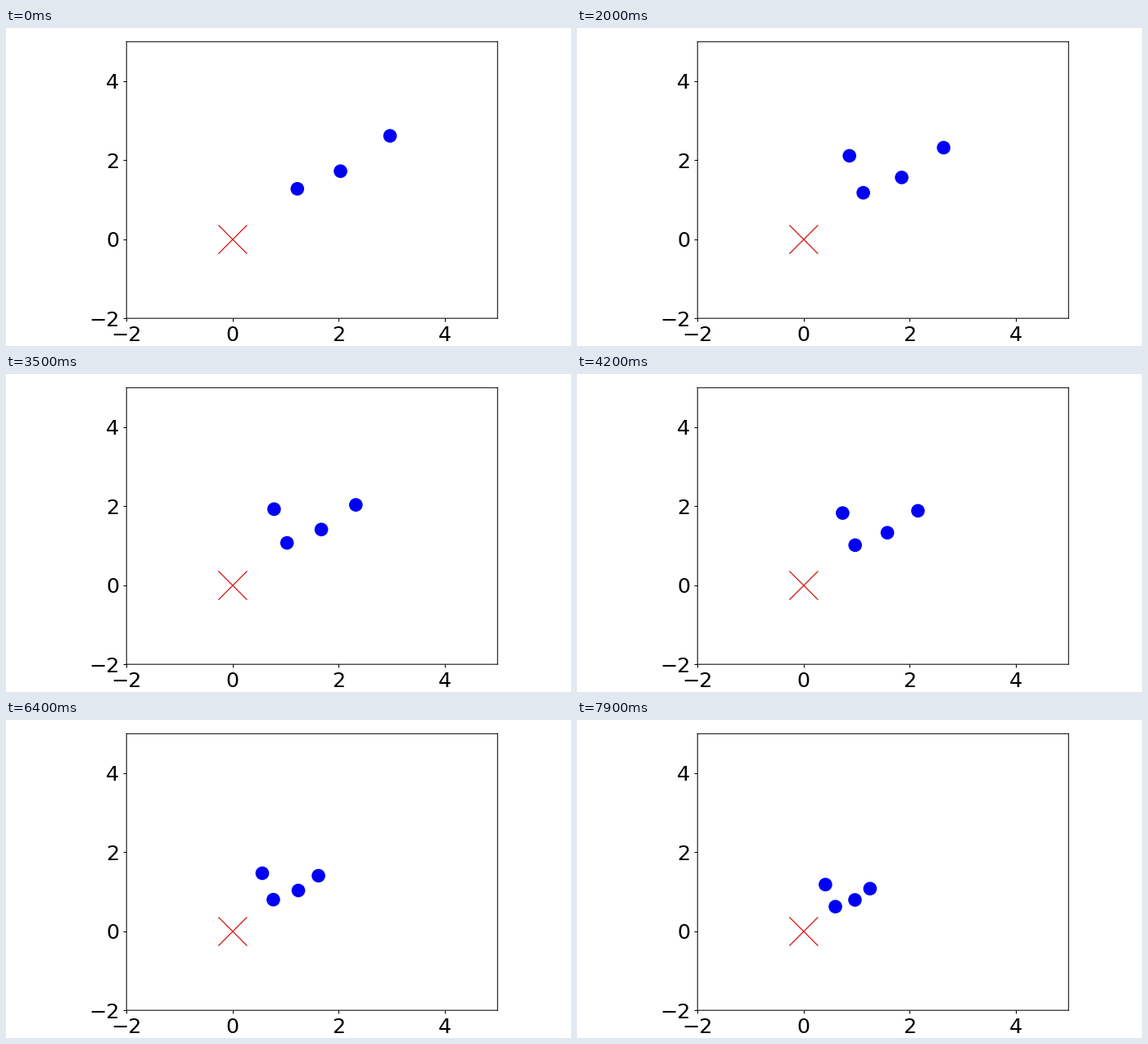
These frames come from a looping animation (690 px wide and 388 px high, 8000 ms). A matplotlib script:

```python
import numpy as np
import matplotlib.pyplot as plt
from matplotlib.animation import FuncAnimation
from matplotlib.patches import Circle

W, H, DPI = 690, 388, 100
SCALE = 0.914          # plot styling relative to matplotlib defaults
FRAMES, STEP = 80, 100
CROSS = np.array([276.9, 258.0])


class Dot:
    """Accelerates evenly from a start point, then coasts at top speed."""

    def __init__(self, start, speed, pull, coast=np.inf, appear=0):
        self.start, self.speed, self.pull = map(np.array, (start, speed, pull))
        self.coast, self.appear = coast, appear
        self.patch = Circle(start, 8.3, fc="#0000f4", ec="none", zorder=3)

    def move(self, t):
        s = min(t, self.coast)
        self.patch.center = (self.start + self.speed * t
                             + self.pull * s * (2 * t - s))
        self.patch.set_visible(t >= self.appear)


def homing(start, rate, gain):
    """A dot that heads straight for the cross."""
    way = CROSS - start
    return Dot(start, way * rate, way * gain)


dots = [
    homing((355.8, 196.2), 0.0306, 0.0043),
    Dot((408.5, 174.7), (-5.05, 3.2), (-0.467, 0.313)),
    Dot((469, 131.6), (-8.9, 6.1), (-0.865, 0.55), coast=4),
    Dot((337.5, 146.6), (-1.75, 3.92), (-0.325, 0.3725), appear=0.1),
]

fig = plt.figure(figsize=(W / DPI, H / DPI), dpi=DPI, facecolor="white")

left, right, top, bottom = 147.2, 600.3, 16.8, 354.2
ax = fig.add_axes([left / W, 1 - bottom / H,
                   (right - left) / W, (bottom - top) / H])
ticks = range(-2, 5, 2)
ax.set(xlim=(-2, 5), ylim=(-2, 5), xticks=ticks, yticks=ticks)
ax.tick_params(labelsize=20 * SCALE, length=3.5 * SCALE,
               pad=3.5 * SCALE, width=0.8 * SCALE)
for spine in ax.spines.values():
    spine.set(linewidth=0.8 * SCALE, snap=False)

# Overlay in pixel coordinates for the cross and the dots.
stage = fig.add_axes([0, 0, 1, 1])
stage.set(xlim=(0, W), ylim=(H, 0))
stage.axis("off")

arm = np.array([-17.5, 17.5])
for slope in (1, -1):
    stage.plot(CROSS[0] + arm, CROSS[1] + slope * arm, color="#d41414",
               lw=SCALE, solid_capstyle="butt")

for dot in dots:
    stage.add_patch(dot.patch)


def update(i):
    for dot in dots:
        dot.move(i * STEP / 1000)
    return [dot.patch for dot in dots]


anim = FuncAnimation(fig, update, frames=FRAMES, interval=STEP,
                     repeat=True, repeat_delay=0)
plt.show()
```
